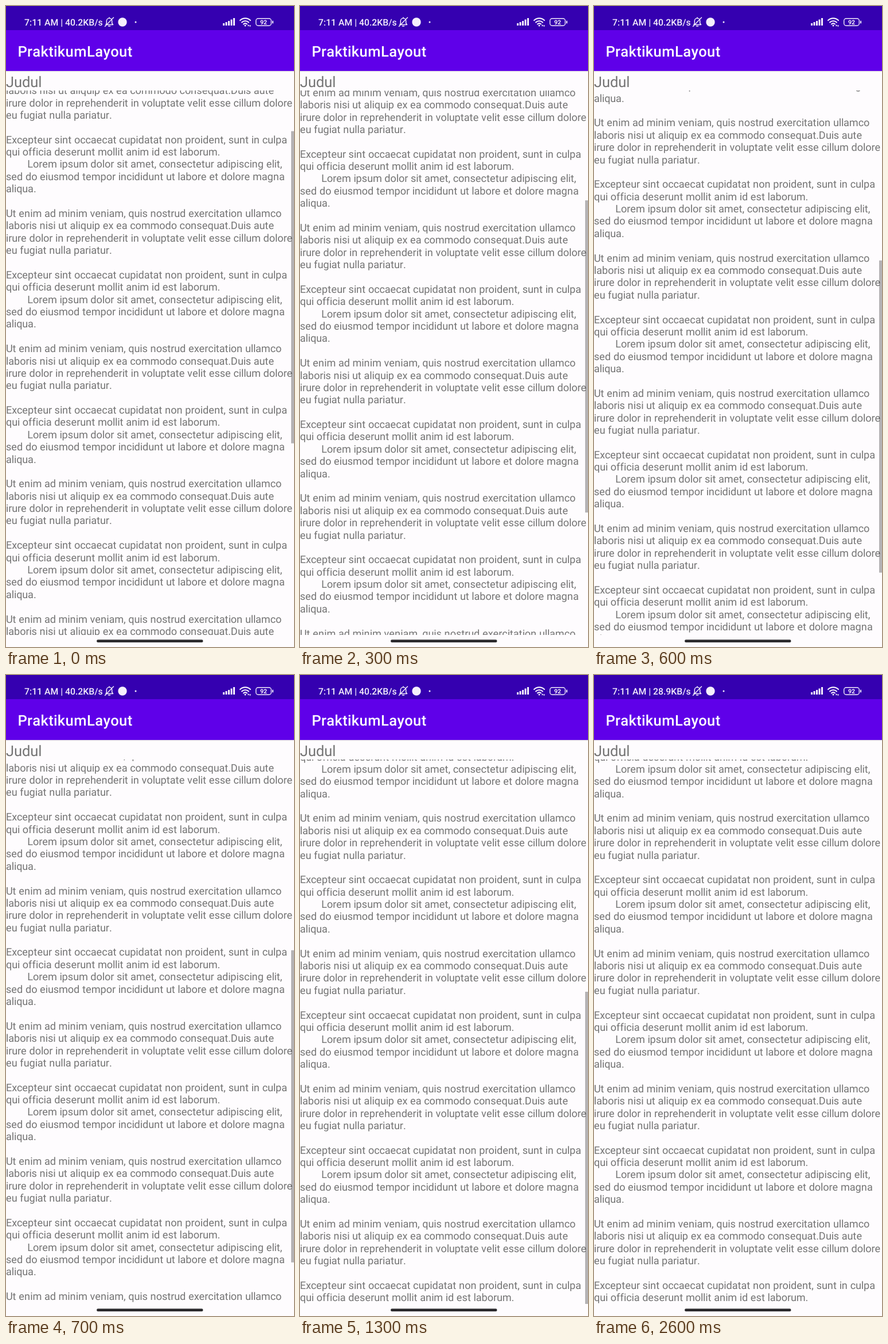
An HTML page that plays this animation: 502 by 1115 pixels, repeating every 2700 ms.

```html
<!DOCTYPE html>
<html lang="id">
<head>
<meta charset="utf-8">
<style>
  html, body { margin: 0; width: 100%; height: 100%; overflow: hidden; background: #fefcfe; }
  svg { display: block; font-family: Roboto, sans-serif; text-rendering: geometricPrecision; }
  .page { fill: #747474; }
  .line { fill: none; stroke: #f4effc; stroke-linecap: round; stroke-linejoin: round; }
</style>
</head>
<body>
<svg width="502" height="1115" viewBox="0 0 502 1115">
  <defs>
    <clipPath id="view"><rect y="147" width="502" height="947"/></clipPath>
    <linearGradient id="shade" x2="0" y2="1">
      <stop stop-color="#000" stop-opacity=".12"/>
      <stop offset="1" stop-color="#000" stop-opacity="0"/>
    </linearGradient>
  </defs>
  <rect width="502" height="1115" fill="#fefcfe"/>

  <g class="page" clip-path="url(#view)"><g id="text"></g></g>
  <rect id="thumb" x="497" width="5" height="543" fill="#000"/>

  <rect y="42" width="502" height="71" fill="#5f00e9"/>
  <rect y="113" width="502" height="2.5" fill="url(#shade)"/>
  <rect width="502" height="42" fill="#3500b0"/>
  <g id="heading" class="page"></g>
  <g id="title" fill="#fff"></g>

  <g fill="#f4effc">
    <text id="status" x="32" y="33.7" font-size="15.75" font-weight="500"></text>
    <path class="line" stroke-width="1.5" d="M174 32.5h12.5l-1.8-2.5v-4a4.7 4.7 0 0 0-9.4 0v4zM180 21v-1M178.5 35h3M172.5 35.5l15-15.5"/>
    <circle cx="203" cy="28" r="7.7"/>
    <circle cx="226" cy="28" r="1.5"/>
    <path d="M378 30h3v4h-3zM382.500 28h3v6h-3zM387 26h3v8h-3zM391.500 23.500h3v10.500h-3zM396 21h3v13h-3z"/>
    <path class="line" stroke-width="2.1" d="M408 25a13 13 0 0 1 18 0M411 28.400a8.700 8.700 0 0 1 12 0M414 31.500a4.500 4.500 0 0 1 6 0"/>
    <circle cx="417" cy="34" r="1.5"/>
    <path d="M421 35l1.500-3 1.500 3zM424 33.500h3l-1.500 3z"/>
    <rect class="line" x="435.700" y="21.700" width="26.600" height="12.600" rx="4" stroke-width="1.400"/>
    <rect x="464" y="25.500" width="2" height="5" rx="1"/>
    <text x="449" y="31.800" font-size="10.500" font-weight="600" text-anchor="middle">92</text>
  </g>
  <rect x="158" y="1102.300" width="185.500" height="4.800" rx="2.400" fill="#2b2a2d"/>
</svg>
<script>
const LOOP = 2700, STEP = 100, MAX_SCROLL = 701;
const SCALE = 502 / 1080; // stage pixels per phone pixel
const LINE = 46 * SCALE;
const paragraph = [
  '\u00a0'.repeat(8) + 'Lorem ipsum dolor sit amet, consectetur adipiscing elit,',
  'sed do eiusmod tempor incididunt ut labore et dolore magna',
  'aliqua.',
  '',
  'Ut enim ad minim veniam, quis nostrud exercitation ullamco',
  'laboris nisi ut aliquip ex ea commodo consequat.Duis aute',
  'irure dolor in reprehenderit in voluptate velit esse cillum dolore',
  'eu fugiat nulla pariatur.',
  '',
  'Excepteur sint occaecat cupidatat non proident, sunt in culpa',
  'qui officia deserunt mollit anim id est laborum.'
];
// [time, distance left to the end of the page]
const scrollKeys = [[0, 581.9], [100, 501.9], [400, 306.7], [600, 189.2], [900, 0]];

const [text, thumb, status, heading, title] =
  ['text', 'thumb', 'status', 'heading', 'title'].map(id => document.getElementById(id));
const measure = document.createElement('canvas').getContext('2d');

// The phone advances each glyph by whole device pixels.
function phoneText(s, x, y, size, weight = 400, spacing = 0) {
  measure.font = `${weight} ${size}px Roboto, sans-serif`;
  const xs = [...s].map(c => {
    const left = x;
    x += (Math.round(measure.measureText(c).width) + spacing) * SCALE;
    return left.toFixed(2);
  });
  return `<text x="${xs.join(' ')}" y="${y.toFixed(2)}" font-size="${size * SCALE}" font-weight="${weight}">${s}</text>`;
}

const lines = Array(7).fill(paragraph).flat();
text.innerHTML = lines.map((s, i) =>
  s && phoneText(s, 0, 1089.3 - (lines.length - 1 - i) * LINE, 39)).join('');
heading.innerHTML = phoneText('Judul', 0, 141, 55);
title.innerHTML = phoneText('PraktikumLayout', 20.5, 88, 55, 500, 0.0125 * 55);

const clamp = v => Math.max(0, Math.min(1, v));

function remaining(t) {
  const i = scrollKeys.findIndex(([time]) => time > t);
  if (i < 0) return 0;
  const [t0, a] = scrollKeys[i - 1], [t1, b] = scrollKeys[i];
  return a + (b - a) * (t - t0) / (t1 - t0);
}

function render(now) {
  const t = Math.floor((now % LOOP + 0.01) / STEP) * STEP;
  const left = remaining(t);
  text.setAttribute('transform', `translate(0 ${left})`);
  thumb.setAttribute('y', 551 - left / MAX_SCROLL * 401.5);
  thumb.setAttribute('opacity', 0.29 * clamp((1960 - t) / 250));
  const label = `7:11 AM | ${t < 2300 ? '40.2' : '28.9'}KB/s`;
  if (status.textContent !== label) status.textContent = label;
}

const start = performance.now();
function tick() {
  render(performance.now() - start);
  requestAnimationFrame(tick);
}
tick();
</script>
</body>
</html>
```
